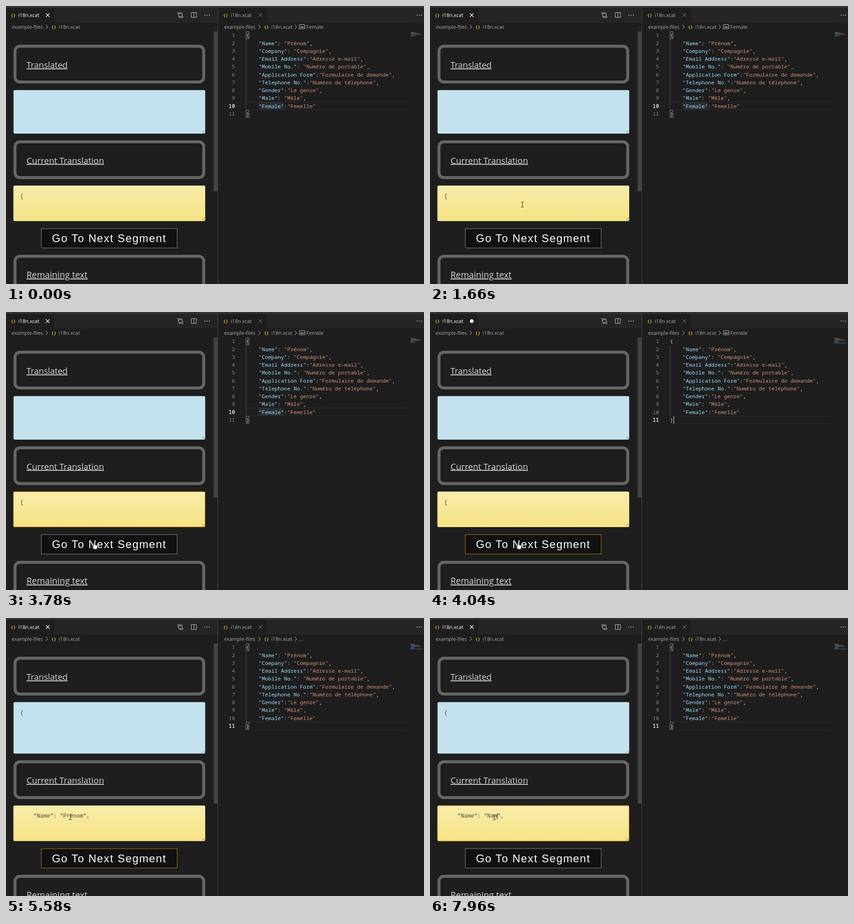
An HTML page for the animation above (8000 ms loop, 917x610 px).

```html
<!DOCTYPE html>
<html lang="en">
<head>
<meta charset="utf-8">
<style>
  html, body { margin: 0; width: 100%; height: 100%; overflow: hidden; background: #1e1e1e; }
  svg { display: block; }
  text { white-space: pre; }
  .ui { font: 11.1px "Open Sans", "Noto Sans", sans-serif; fill: #a9a9a9; }
  .code { font: 500 11.6px "Noto Sans Mono", "DejaVu Sans Mono", monospace; fill: #d4d4d4; }
  .num { text-anchor: end; fill: #858585; font-weight: 400; }
  .num.on { fill: #c6c6c6; font-weight: bold; }
  .brace { font: bold 9px "Noto Sans Mono", monospace; fill: #ecbb35; }
  .head { font-family: "Open Sans", "Noto Sans", sans-serif; fill: #d4d4d4; text-decoration: underline; }
  .area { font: 12.13px "Liberation Mono", monospace; fill: #4d483b; }
  .btn { font: 24px "Liberation Sans", sans-serif; letter-spacing: 1.6px; fill: #fff; }
  .line { fill: none; stroke: #c5c5c5; }
</style>
</head>
<body>
<svg width="917" height="610" viewBox="0 0 917 610">
  <defs>
    <linearGradient id="gold" x2="0" y2="1"><stop stop-color="#f9ecab"/><stop offset="1" stop-color="#f5e383"/></linearGradient>
    <path id="cross" d="M-4-4 4 4M4-4-4 4"/>
    <path id="chev" d="M-2-4.5 2 0-2 4.5" class="line"/>
    <path id="grip" d="M-7-1.5-1.5-7M-3.5-1.5-1.5-3.5" fill="none" stroke="#777" stroke-width=".9"/>
    <rect id="frame" x="19.75" y="3.25" width="414" height="78.5" rx="10.5" fill="none" stroke="#666" stroke-width="6.5"/>
    <g id="dots" fill="#c5c5c5"><circle cx="-5" r="1.1"/><circle r="1.1"/><circle cx="5" r="1.1"/></g>
  </defs>

  <rect width="917" height="610" fill="#1e1e1e"/>
  <rect width="917" height="36" fill="#252526"/>
  <rect y="4" width="106" height="32" fill="#1e1e1e"/>
  <rect x="466" y="4" width="106" height="32" fill="#1e1e1e"/>
  <rect width="917" height="4" fill="#323233"/>

  <!-- tabs and breadcrumbs -->
  <text class="brace" x="10.5" y="23">{}</text>
  <text class="ui" x="27" y="24" style="fill:#fff">i18n.xcat</text>
  <use id="close" href="#cross" x="91.5" y="20" stroke="#fff" stroke-width="1.2"/>
  <circle id="dirty" cx="91.5" cy="20" r="4" fill="#fff"/>
  <text class="brace" x="476.5" y="23">{}</text>
  <text class="ui" x="493" y="24">i18n.xcat</text>
  <use href="#cross" x="558" y="20" stroke="#888"/>
  <g class="line">
    <circle cx="378.5" cy="16" r="2"/><circle cx="386.5" cy="24" r="2"/>
    <path d="M378.5 18V24H383M381 21.5 383.5 24 381 26.5M386.5 22V16H382M384 13.5 381.5 16 384 18.5"/>
    <path d="M406.5 14.5H418V25H406.5ZM412.3 14.5V25"/>
  </g>
  <use href="#dots" x="441" y="20"/><use href="#dots" x="907" y="20"/>
  <text class="ui" x="12.5" y="50">example-files</text>
  <use href="#chev" x="89.5" y="46"/>
  <text class="brace" x="99.5" y="49">{}</text>
  <text class="ui" x="116" y="50">i18n.xcat</text>
  <text class="ui" x="478.5" y="50">example-files</text>
  <use href="#chev" x="556" y="46"/>
  <text class="brace" x="566" y="49">{}</text>
  <text class="ui" x="582" y="50">i18n.xcat</text>
  <use href="#chev" x="635.5" y="46"/>
  <g id="crumb">
    <rect x="643.5" y="41" width="12" height="9" rx="1" class="line"/>
    <text x="645" y="47.5" font-family="Open Sans, sans-serif" font-size="5.5" font-weight="bold" fill="#c5c5c5">abc</text>
    <text class="ui" x="659" y="50">Female</text>
  </g>
  <text id="ellipsis" class="ui" x="642" y="50">...</text>

  <!-- preview pane -->
  <use href="#frame" y="85"/>
  <text class="head" x="45" y="136" font-size="18.5">Translated</text>
  <rect id="blue" x="16.5" y="184.5" width="420.5" rx="3" fill="#c4e2ee"/>
  <text id="done" class="area" x="31" y="212" style="fill:#8b9a a1">{</text>
  <g id="lower">
    <use href="#grip" x="437" y="280"/>
    <use href="#frame" y="294.7"/>
    <text class="head" x="45" y="345.5" font-size="18.9">Current Translation</text>
    <rect x="16.2" y="394" width="420.8" height="78" rx="3" fill="url(#gold)"/>
    <rect id="focus" x="16.5" y="394.5" width="420" height="77" rx="2.5" fill="none" stroke="#e9a11c"/>
    <rect id="sel" x="125.6" y="410.5" width="43.7" height="14" fill="#0078d7"/>
    <text id="now" class="area" x="31" y="420.8"></text>
    <rect id="caret" y="410.5" width="1" height="13.5" fill="#222"/>
    <use href="#grip" x="437" y="472"/>
    <rect id="button" x="77.5" y="488.5" width="298" height="42.5" fill="#111"/>
    <text class="btn" x="100.8" y="518">Go To Next Segment</text>
    <use href="#frame" y="546"/>
    <text class="head" x="45" y="597" font-size="19.2">Remaining text</text>
  </g>
  <rect x="455.5" y="56" width="9" height="351" fill="#424242"/>
  <rect x="464" y="4" width="1.2" height="606" fill="#444"/>

  <!-- editor -->
  <path id="row" d="M527 0H879M527 17.3H879" stroke="#2b2b2b"/>
  <rect id="word" x="554.5" y="210.5" width="55" height="17" fill="#2a2f33"/>
  <path d="M526.8 73V228" stroke="#585858"/>
  <path id="match" d="M526.5 56.5H533V72H526.5ZM526.5 229H533V244.5H526.5Z" fill="none" stroke="#888"/>
  <g id="editor"></g>
  <rect id="bar" x="534" y="229" width="1.3" height="16" fill="#ccc"/>
  <g id="map" opacity=".65"></g>
  <rect id="mark" x="886" y="67.5" width="29" height="1.3" fill="#27527d"/>

  <g id="tip">
    <rect x="874" y="600" width="27" height="10" fill="#777"/>
    <text x="878" y="612" font-family="Open Sans, sans-serif" font-size="7.5" fill="#333">Pause</text>
  </g>

  <g id="pointer">
    <path id="arrow" d="M0 0V10.5L2.5 8.3 4.2 12 5.8 11.3 4.2 7.6H7.3Z" fill="#fff" stroke="#000" stroke-width=".6"/>
    <path id="beam" d="M-3-5.5H-1Q0-5.5 0-4.5Q0-5.5 1-5.5H3M0-4.5V4.5M-3 5.5H-1Q0 5.5 0 4.5Q0 5.5 1 5.5H3" fill="none"/>
    <path id="hand" d="M-1.3.8Q0-.8 1.3.8V5L5 5.8Q6.3 6.2 6.2 7.5V10.5L5 14.5H-1.3L-4.3 9.5Q-4.3 7.8-2.8 8.4L-1.3 9.7Z" fill="#fff" stroke="#222" stroke-width=".7"/>
  </g>
</svg>
<script>
const $ = id => document.getElementById(id);
const set = (id, name, value) => $(id).setAttribute(name, value);
const show = (id, on) => set(id, 'visibility', on ? 'visible' : 'hidden');

const entries = [
  ['Name', ': ', 'Prénom'], ['Company', ': ', 'Compagnie'],
  ['Email Address', ':', 'Adresse e-mail'], ['Mobile No.', ': ', 'Numéro de portable'],
  ['Application Form', ':', 'Formulaire de demande'], ['Telephone No.', ':', 'Numéro de téléphone'],
  ['Gender', ':', 'Le genre'], ['Male', ': ', 'Mâle'], ['Female', ':', 'Femelle']
];
const lines = entries.map(([key, sep, value], i) =>
  `    <tspan fill="#9cdcfe">"${key}"</tspan>${sep}<tspan fill="#ce9178">"${value}"</tspan>${i < 8 ? ',' : ''}`);
$('editor').innerHTML = ['{', ...lines, '}'].map((line, i) => {
  const y = 68.3 + i * 17.25;
  return `<text class="code num" id="n${i + 1}" x="502.5" y="${y}">${i + 1}</text>
    <text class="code" x="526.5" y="${y}">${line}</text>`;
}).join('');
$('map').innerHTML = entries.map(([key, sep, value], i) => {
  const y = 57.3 + i * 1.15, split = 888 + (key.length + 3) * .6;
  return `<path d="M888 ${y}H${split}" stroke="#567f98"/>
    <path d="M${split} ${y}h${value.length * .6}" stroke="#7c6050"/>`;
}).join('');

// Pointer moves: start, end, number of steps, way points
const moves = [
  [450, 850, 6, [[900, 640], [900, 620], [770, 300], [640, 84], [520, 330], [451, 493], [434, 494]]],
  [1120, 1390, 5, [[434, 494], [203.5, 429]]],
  [1590, 2260, 11, [[203.5, 429], [194, 506]]],
  [4970, 5580, 10, [[194, 506], [141, 437]]]
];

function pointerAt(t) {
  const [start, end, steps, pts] = moves.filter(m => t >= m[0]).pop() || moves[0];
  const step = Math.floor((t - start) / (end - start) * (steps - 1) + 1e-6) + 1;
  let p = Math.min(1, Math.max(0, step / steps));
  if (pts.length > 2) return pts[Math.round(p * steps)];
  p *= p * (3 - 2 * p);
  return pts[0].map((v, i) => v + (pts[1][i] - v) * p);
}

function draw(t) {
  const moved = t >= 4110, shift = moved ? 17.6 : 0;
  const last = t >= 4040, dirty = last && t < 5050;

  show('dirty', dirty);
  show('close', !dirty);
  show('crumb', t < 4440);
  show('ellipsis', t >= 4440);
  show('tip', t >= 450 && t < 850);

  set('n10', 'class', 'code num' + (last ? '' : ' on'));
  set('n11', 'class', 'code num' + (last ? ' on' : ''));
  set('row', 'transform', `translate(0 ${last ? 228.3 : 210.5})`);
  show('word', !last);
  show('mark', last);
  show('match', !last || moved);
  show('bar', last && !moved);

  set('blue', 'height', 95.5 + shift);
  set('lower', 'transform', `translate(0 ${shift})`);
  show('done', moved);

  const editing = t >= 5850, selected = t >= 5990 && t < 7300;
  const typed = t < 7300 ? 'Prénom' : 'Nam'.slice(0, t < 7700 ? 1 : t < 7960 ? 2 : 3);
  const value = selected ? `<tspan fill="#fff">${typed}</tspan>` : typed;
  const text = moved ? `    "Name": "${value}",` : '{';
  if ($('now').innerHTML !== text) $('now').innerHTML = text;
  show('sel', selected);
  show('caret', editing && !selected);
  set('caret', 'x', 125.2 + 7.28 * (t < 7300 ? 2 : typed.length));
  show('focus', editing || t >= 3780 && t < 3840);
  set('button', 'stroke', t >= 3840 && !editing ? '#b97a10' : '#858585');

  const [x, y] = pointerAt(t);
  const onGold = x < 437 && y > 394 + shift && y < 472 + shift;
  const onButton = x > 77 && x < 376 && y > 488 + shift && y < 531 + shift;
  const beam = onGold || x > 466;
  // The hand stays until the pointer itself moves off the button
  const hand = onButton || moved && t < 4970;
  set('pointer', 'transform', `translate(${x} ${y})`);
  show('beam', beam);
  show('hand', hand);
  show('arrow', !beam && !hand);
  set('beam', 'stroke', onGold ? '#222' : '#ddd');
}

const begin = performance.now();
function tick() {
  draw((performance.now() - begin) % 8000);
  requestAnimationFrame(tick);
}
tick();
</script>
</body>
</html>
```
